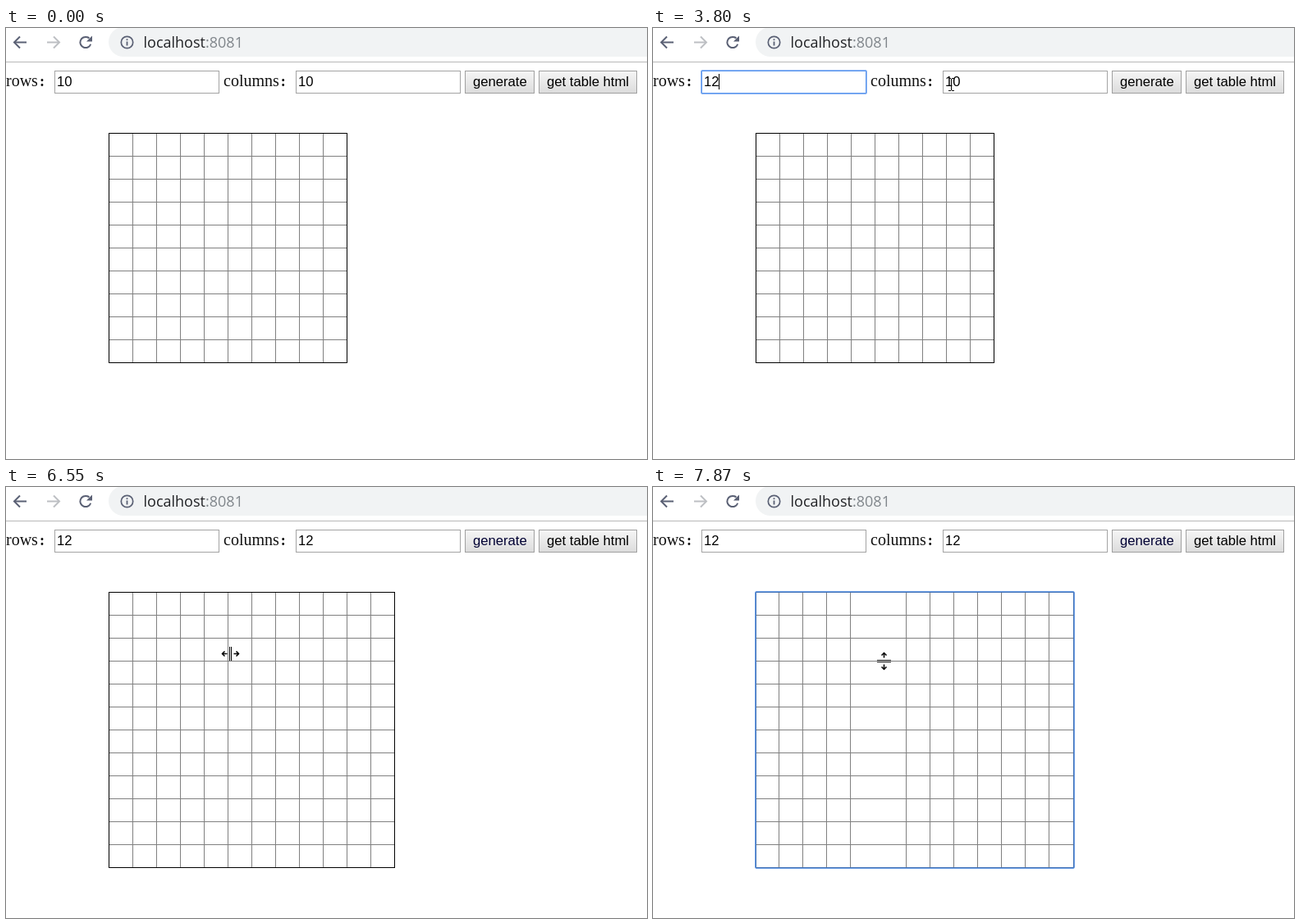
An HTML page with a canvas for the animation above (8000 ms loop, 781 by 526 pixels).

```html
<!DOCTYPE html>
<html lang="en">
<head>
<meta charset="utf-8">
<title>Table generator</title>
<style>
html, body { margin: 0; width: 100%; height: 100%; overflow: hidden; background: #fff; }
canvas { display: block; }
</style>
</head>
<body>
<canvas id="stage" width="781" height="526"></canvas>
<script>
const ctx = document.getElementById('stage').getContext('2d');
const LOOP = 8000;
const STEP = 78; // ms between screen updates
const ARIAL = '16.67px "Liberation Sans", Arial, sans-serif';
const SERIF = '20px "Liberation Serif", serif';
const COLON = 'bold 18px "Liberation Serif", serif';
const URL_FONT = '18px "Open Sans", sans-serif';
const CELL_W = 29, CELL_H = 28, LEFT = 125, TOP = 128;

// Pointer strokes: start, updates, end point
const strokes = [
  [440, 7, 290, 158], [1150, 8, 165, 65], [1840, 2, 156, 65],
  [2230, 11, 108, 65], [3100, 11, 363, 69], [3950, 3, 386, 62],
  [4410, 2, 373, 62], [4810, 9, 602, 68], [5660, 5, 344, 237],
  [6050, 5, 275, 196], [6470, 2, 272.5, 203], [6790, 3, 285, 201],
  [7025, 4, 308.5, 204], [7420, 3, 284, 209], [7870, 1, 281, 212]
];

const easeOut = k => 1 - (1 - k) ** 3;

// Each stroke decelerates towards its end point in discrete updates
function pointerAt(t) {
  let x = 892, y = 712;
  for (const [start, count, toX, toY] of strokes) {
    if (t < start) break;
    const done = Math.floor((t - start) / STEP + 0.2) + 1;
    const k = easeOut(Math.min(1, done / count));
    x += (toX - x) * k;
    y += (toY - y) * k;
  }
  return { x, y };
}

function rect(x, y, w, h, color) {
  ctx.fillStyle = color;
  ctx.fillRect(x, y, w, h);
}

function frame(x, y, w, h, color) {
  ctx.strokeStyle = color;
  ctx.lineWidth = 1;
  ctx.strokeRect(x + 0.5, y + 0.5, w - 1, h - 1);
}

// Focus ring around a box
function ring(x, y, w, h, outer, inner) {
  frame(x, y, w, h, inner);
  ctx.beginPath();
  ctx.roundRect(x - 0.5, y - 0.5, w + 1, h + 1, 1.5);
  ctx.strokeStyle = outer;
  ctx.stroke();
}

function text(str, x, y, font, color) {
  ctx.font = font;
  ctx.fillStyle = color;
  ctx.fillText(str, x, y);
}

function line(points, color, width) {
  ctx.beginPath();
  points.forEach(([x, y]) => ctx.lineTo(x, y));
  ctx.strokeStyle = color;
  ctx.lineWidth = width;
  ctx.stroke();
}

function navArrow(x, dir, color) {
  line([[x - 7 * dir, 17.5], [x + 8 * dir, 17.5]], color, 2);
  line([[x, 10.5], [x - 7 * dir, 17.5], [x, 24.5]], color, 2);
}

function circle(x, y, r, from, to, width, color) {
  ctx.beginPath();
  ctx.arc(x, y, r, from, to);
  ctx.strokeStyle = color;
  ctx.lineWidth = width;
  ctx.stroke();
}

function drawToolbar() {
  const icon = '#5a6074';
  navArrow(17, 1, icon);
  navArrow(58, -1, '#bdbfc3');
  circle(97, 17.5, 6.6, 0.35, -0.85, 2, icon);
  ctx.beginPath();
  ctx.moveTo(105, 9.5);
  ctx.lineTo(105, 16.5);
  ctx.lineTo(98, 16.5);
  ctx.fillStyle = icon;
  ctx.fill();

  ctx.beginPath();
  ctx.roundRect(LEFT, -1, 700, 36, 18);
  ctx.fillStyle = '#f1f3f4';
  ctx.fill();
  circle(147.5, 17.5, 7.2, 0, Math.PI * 2, 1.7, icon);
  rect(146.6, 13.3, 1.8, 1.8, icon);
  rect(146.6, 16.5, 1.8, 5, icon);
  text('localhost', 167.5, 24, URL_FONT, '#202124');
  text(':8081', 243, 24, URL_FONT, '#80868b');
  rect(0, 41, 781, 1, '#b8b8b8');
}

function drawLabel(str, x) {
  text(str, x, 71, SERIF, '#111');
  text(':', x + ctx.measureText(str).width + 2, 71, COLON, '#111');
}

function drawInput(x, { value, focus, caret, selected }) {
  frame(x, 52, 201, 28, '#a3a3a3');
  if (focus) ring(x, 52, 201, 28, '#8fb6f3', '#5a96ee');
  text(value, x + 3, 71, ARIAL, '#000');
  if (selected) {
    rect(x + 12, 56, 10, 19, '#3390ff');
    text(value[1], x + 12.3, 71, ARIAL, '#fff');
  } else if (caret) {
    rect(x + 2 + Math.round(ctx.measureText(value).width), 56, 1, 19, '#000');
  }
}

function drawButton(str, x, w, { hover, pressed, color = '#000' }) {
  const shades = pressed ? ['#dcdcdc', '#efefef']
    : hover ? ['#fafafa', '#e6e6e6'] : ['#f5f5f5', '#dcdcdc'];
  const fill = ctx.createLinearGradient(0, 53, 0, 79);
  shades.forEach((shade, i) => fill.addColorStop(i, shade));
  rect(x, 52, w, 28, fill);
  frame(x, 52, w, 28, '#a0a0a0');
  ctx.font = ARIAL;
  text(str, Math.round(x + (w - ctx.measureText(str).width) / 2), 71, ARIAL, color);
}

// Grid lines; dragging moves the right side of the fifth column
function tableLines(t) {
  const n = t >= 5430 ? 12 : 10;
  const dragging = t >= 6790;
  const xs = [], ys = [];
  for (let i = 0; i <= n; i++) {
    xs.push(LEFT + CELL_W * i);
    ys.push(TOP + CELL_H * i);
  }
  if (dragging) {
    const grow = Math.round(pointerAt(Math.min(t, 7400)).x - 0.8) - xs[5];
    const shrink = 1 + grow / 40;
    for (let i = 1; i <= n; i++) xs[i] += i < 5 ? -Math.floor(shrink) : grow;
    xs[n]++;
  }
  return { xs, ys, dragging };
}

function drawTable({ xs, ys, dragging }, caret) {
  const w = xs.at(-1) - LEFT + 1, h = ys.at(-1) - TOP + 1;
  xs.slice(1, -1).forEach(x => rect(x, TOP, 1, h, '#808080'));
  ys.slice(1, -1).forEach(y => rect(LEFT, y, w, 1, '#808080'));
  if (dragging) ring(LEFT, TOP, w, h, '#6d9fe6', '#3f6fb4');
  else frame(LEFT, TOP, w, h, '#000');
  if (caret) rect(242, 187, 2, 22, '#000');
}

const near = (v, lines) => lines.some(l => Math.abs(v - l) < 3);

function cursorKind({ x, y }, { xs, ys }) {
  if (y > 52 && y < 80 && [59, 353].some(left => x > left && x < left + 201)) return 'text';
  if (x < LEFT || y < TOP || x > xs.at(-1) + 3 || y > ys.at(-1) + 3) return 'arrow';
  return near(x, xs) ? 'col' : near(y, ys) ? 'row' : 'arrow';
}

function drawArrow() {
  ctx.beginPath();
  [[0, 0], [0, 16], [3.7, 12.6], [6.2, 18], [8.6, 17], [6.2, 11.6], [11.2, 11.6]]
    .forEach(([x, y]) => ctx.lineTo(x + 0.5, y + 0.5));
  ctx.closePath();
  ctx.fillStyle = '#fff';
  ctx.fill();
  ctx.strokeStyle = '#000';
  ctx.lineWidth = 1;
  ctx.stroke();
}

function drawBeam() {
  rect(0, -7, 1, 14, '#000');
  for (const y of [-8, 7]) {
    rect(-3, y, 3, 1, '#000');
    rect(1, y, 3, 1, '#000');
  }
}

function drawResize() {
  rect(-1, -8, 3, 17, '#fff');
  rect(-1, -8, 1, 17, '#000');
  rect(1, -8, 1, 17, '#000');
  for (const s of [-1, 1]) {
    line([[0.5 + 4 * s, 0.5], [0.5 + 10 * s, 0.5]], '#000', 1.5);
    line([[0.5 + 7 * s, -2.5], [0.5 + 10 * s, 0.5], [0.5 + 7 * s, 3.5]], '#000', 1.5);
  }
}

function drawCursor(pos, kind) {
  ctx.save();
  ctx.translate(Math.round(pos.x), Math.round(pos.y));
  if (kind === 'arrow') drawArrow();
  else if (kind === 'text') drawBeam();
  else {
    if (kind === 'row') ctx.transform(0, 1, 1, 0, 0, 0);
    drawResize();
  }
  ctx.restore();
}

function draw(t) {
  const during = (from, to) => t >= from && t < to;
  const typed = (erase, type) => t < erase ? '10' : t < type ? '1' : '12';
  const pos = pointerAt(t);
  const table = tableLines(t);

  rect(0, 0, 781, 526, '#fff');
  drawToolbar();
  drawLabel('rows', 0);
  drawInput(59, {
    value: typed(3100, 3334),
    focus: during(2230, 4260),
    caret: during(2230, 2700) || during(3100, 3880),
    selected: during(2854, 3100)
  });
  drawLabel('columns', 265);
  drawInput(353, {
    value: typed(4490, 4890),
    focus: during(4260, 5350),
    caret: during(4260, 4410) || during(4490, 5350),
    selected: during(4410, 4490)
  });
  drawButton('generate', 559, 85, {
    hover: pos.x > 559 && pos.x < 644 && pos.y > 52 && pos.y < 80,
    pressed: during(5350, 5430),
    color: t < 5350 ? '#000' : '#003'
  });
  drawButton('get table html', 649, 120, {});
  drawTable(table, during(6790, 7870));

  const hidden = t < 440 || during(3010, 3100) || during(4640, 4810);
  if (!hidden) drawCursor(pos, cursorKind(pos, table));
}

function tick() {
  draw(performance.now() % LOOP);
  requestAnimationFrame(tick);
}
tick();
</script>
</body>
</html>
```
